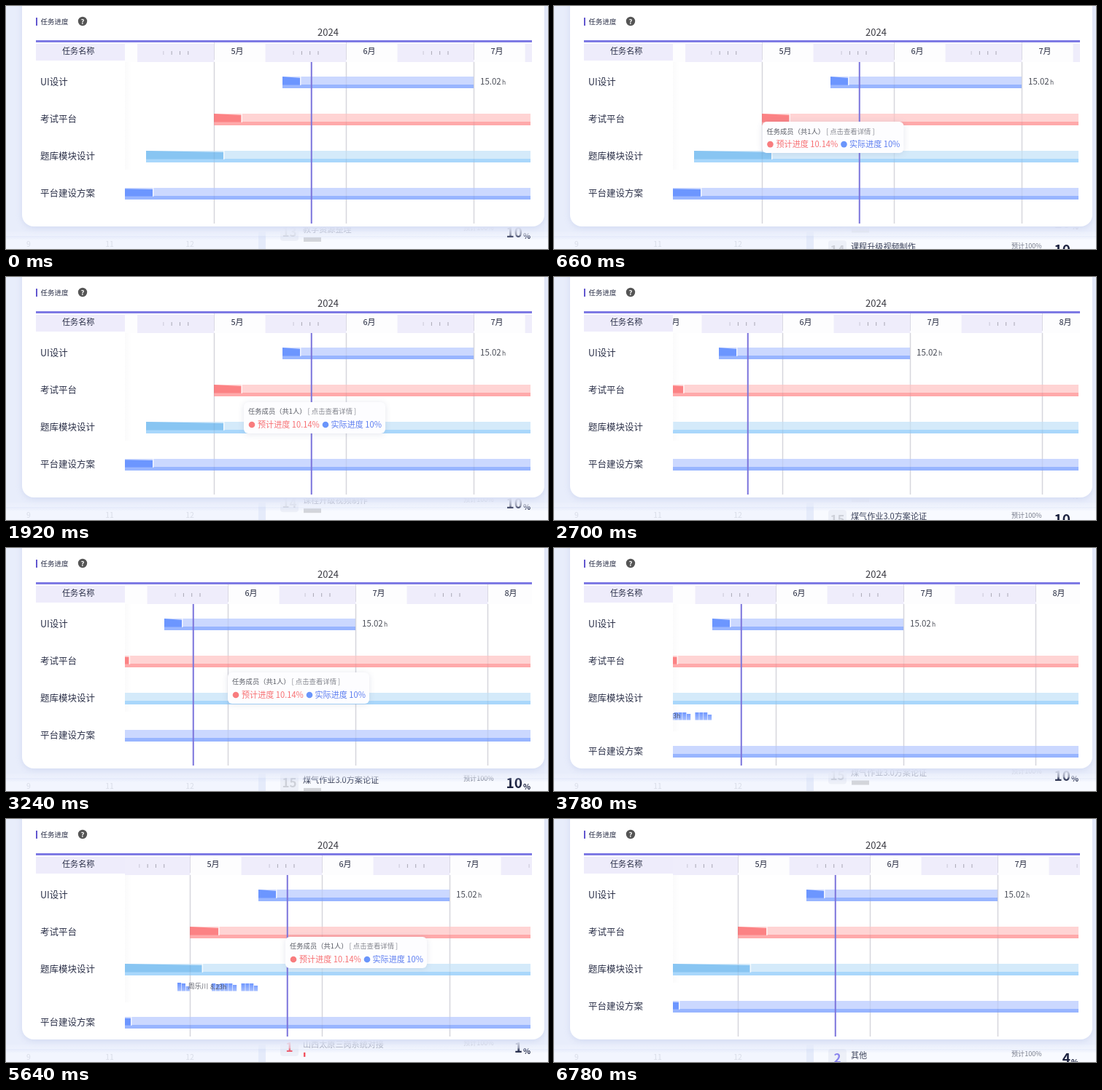
These frames come from a looping animation (743 by 334 pixels, 6840 ms). An HTML page with a canvas:

```html
<!DOCTYPE html>
<html lang="zh-CN">
<head>
<meta charset="utf-8">
<title>任务进度</title>
<style>
html, body { margin: 0; width: 100%; height: 100%; overflow: hidden; background: #e8edfb; }
canvas { display: block; width: 743px; height: 334px; }
</style>
</head>
<body>
<canvas id="stage"></canvas>
<script>
const W = 743, H = 334, LOOP = 6840, STEP = 60;
const FONT = '"Noto Sans CJK SC", "Noto Sans CJK", "Noto Sans CJK JP", sans-serif';
const canvas = document.getElementById('stage');
const ctx = canvas.getContext('2d');
const dpr = window.devicePixelRatio || 1;
canvas.width = W * dpr;
canvas.height = H * dpr;

const LEFT = 163, RIGHT = 719, DAY = 5.84;
const MONTHS = [[4, 110], [5, 285.5], [6, 466.5], [7, 641.5], [8, 822.5]];

// solid: right end of the finished part; drag: how far it follows the pan
const ROWS = [
  { name: 'UI设计', y: 97, from: 379, to: 641, solid: 403, drag: 1,
    light: '#cbd8ff', strip: '#98b5ff', dark: '#6c96ff' },
  { name: '考试平台', y: 148, from: 285, to: 1000, solid: 322.5, drag: 0.95,
    light: '#ffd4d4', strip: '#ffa9aa', dark: '#fc8284' },
  { name: '题库模块设计', y: 199, from: 192, to: 1000, solid: 298, drag: 0.89,
    light: '#d4eafa', strip: '#a9d7fb', dark: '#88c5f2' },
  { name: '平台建设方案', y: 250, from: 100, to: 1000, solid: 201, drag: 0.91,
    light: '#cbd8ff', strip: '#98b5ff', dark: '#6c96ff' }
];

const HOURS = [
  { x: 268, tops: [225, 226, 230] },
  { x: 315, tops: [226, 227, 226, 226, 226, 228] },
  { x: 355.5, tops: [226, 226, 226, 229] }
];

const QUEUE = [
  { rank: 13, name: '教学资源整理', pct: 10 },
  { rank: 14, name: '课程升级视频制作', pct: 10 },
  { rank: 15, name: '煤气作业3.0方案论证', pct: 10 },
  { rank: 1, name: '山西太原三岗系统对接', pct: 1, color: '#f2525f' },
  { rank: 2, name: '其他', pct: 4, color: '#8a84ee' }
];

// each path: [time, x, y] points, shown from the first time to the last
const TIPS = [
  [[180, 384, 117], [420, 384, 117], [720, 274, 164], [900, 274, 164]],
  [[1680, 326, 172], [2100, 326, 172]],
  [[3120, 304, 171], [3480, 304, 171]],
  [[5400, 311, 166], [5520, 311, 166], [5640, 383, 162], [6000, 383, 162]]
];

const clamp = v => Math.max(0, Math.min(1, v));
const lerp = (a, b, u) => a + (b - a) * u;
const smooth = u => u * u * (3 - 2 * u);

function pan(t) {
  if (t < 4700) return -162 * (1 - Math.pow(1 - clamp((t - 2280) / 680), 3));
  return lerp(-162, -33, smooth(clamp((t - 4700) / 680)));
}

const isOpen = t => (t >= 960 && t < 1920) || (t >= 3420 && t < 6060);

function rect(x, y, w, h, fill) {
  ctx.fillStyle = fill;
  ctx.fillRect(x, y, w, h);
}

function round(x, y, w, h, r, fill) {
  ctx.beginPath();
  ctx.roundRect(x, y, w, h, r);
  ctx.fillStyle = fill;
  ctx.fill();
}

function dot(x, y, r, fill) {
  ctx.beginPath();
  ctx.arc(x, y, r, 0, Math.PI * 2);
  ctx.fillStyle = fill;
  ctx.fill();
}

// y is the optical middle of the line
function text(s, x, y, size, fill, align = 'left', weight = 400) {
  ctx.font = `${weight} ${size}px ${FONT}`;
  ctx.textAlign = align;
  ctx.fillStyle = fill;
  ctx.fillText(s, x, y + size * 0.37);
}

function fade(x0, y0, x1, y1, ...stops) {
  const g = ctx.createLinearGradient(x0, y0, x1, y1);
  stops.forEach(([at, color]) => g.addColorStop(at, color));
  return g;
}

function clipped(x, y, w, h, draw) {
  ctx.save();
  ctx.beginPath();
  ctx.rect(x, y, w, h);
  ctx.clip();
  draw();
  ctx.restore();
}

function shadow(color, blur, dy) {
  ctx.shadowColor = color;
  ctx.shadowBlur = blur * dpr;
  ctx.shadowOffsetY = dy * dpr;
}

function queueItem(item, y) {
  const color = item.color || '#cdd0d8';
  round(376, y - 9, 25, 25, 4, '#edf0f8');
  text(item.rank, 388.5, y + 4, 17, color, 'center', 700);
  text(item.name, 407, y, 11.1, '#3a4159');
  text('预计100%', 627, y - 2, 9.1, '#777c8a');
  text(item.pct, 708, y + 4, 19, '#1d2340', 'right', 700);
  text('%', 709, y + 9, 10.5, '#1d2340', 'left', 700);
  rect(408, y + 11, item.pct * 2.4, 6, item.color || '#d3d5da');
}

function backdrop(t) {
  rect(0, 0, W, H, '#e8edfb');
  rect(0, 310, 346, 24, '#f2f5fe');
  rect(346, 310, 10, 24, '#e5ebfa');
  rect(356, 310, 387, 24, '#f8faff');
  [[9, 31], [11, 142], [12, 252]].forEach(([n, x]) =>
    text(n, x, 327, 10.5, '#d9dde8', 'center'));

  clipped(356, 304, 387, 30, () => {
    QUEUE.forEach((item, i) => queueItem(item, 307 + 37 * i - t * 0.01917));
  });
  rect(0, 303, W, 14, fade(0, 303, 0, 317,
    [0, 'rgba(232,237,251,1)'], [0.35, 'rgba(232,237,251,.85)'],
    [0.85, 'rgba(232,237,251,.6)'], [1, 'rgba(232,237,251,0)']));
  rect(0, 316, W, 6, fade(0, 316, 0, 322,
    [0, 'rgba(190,203,240,.25)'], [1, 'rgba(190,203,240,0)']));

  ctx.save();
  shadow('rgba(150,165,215,.28)', 9, 2);
  round(22, -20, 716, 323, 16, '#fff');
  ctx.restore();
}

function header(dx) {
  rect(41, 16, 2, 11, '#6257cf');
  text('任务进度', 47.5, 21, 9.5, '#2b3048');
  dot(105, 21, 6.2, '#555');
  text('?', 105, 21, 9.5, '#fff', 'center', 700);
  text('2024', 441.5, 36.5, 13, '#3a3a42', 'center');

  rect(41, 52, 122, 23, '#eeecfb');
  text('任务名称', 77, 62, 11.1, '#2b3048');

  clipped(LEFT, 49, 558, 28, () => {
    rect(LEFT, 49, 558, 28, '#fdfdfe');
    MONTHS.forEach(([n, x0], i) => {
      const x = x0 + dx;
      const next = MONTHS[i + 1] ? MONTHS[i + 1][1] + dx : x + 31 * DAY;
      const start = x + 12 * DAY;
      rect(start, 52, next - start, 25, '#efedfb');
      for (let k = 0; k < 4; k++) {
        const tx = (start + next) / 2 + (k - 1.5) * 11.3;
        rect(tx - 0.5, 62, 1, 5, k ? '#a9a8b5' : '#c9c7d6');
      }
      rect(x - 0.5, 49, 1, 25, '#d9d8e4');
      text(n + '月', x + 31.5, 62, 11, '#23283e', 'center', 500);
    });
  });
  rect(41, 47, 680, 3, '#7d79e4');
}

function bar(row, y, dx) {
  const a = row.from + dx, b = Math.min(row.to + dx, RIGHT);
  const s = row.solid + dx * row.drag;
  rect(a, y, b - a, 16, row.light);
  rect(a, y + 11, b - a, 5, row.strip);
  ctx.beginPath();
  ctx.moveTo(a, y);
  ctx.lineTo(s, y + 2);
  ctx.lineTo(s, y + 11.5);
  ctx.lineTo(a, y + 11.5);
  ctx.fillStyle = row.dark;
  ctx.fill();
  rect(s, y, 1.5, 12, 'rgba(255,255,255,.75)');
}

function hours(dx, t) {
  const fill = fade(0, 225, 0, 237, [0, '#6a93ff'], [1, '#a9c1ff']);
  HOURS.forEach(group => group.tops.forEach((top, i) =>
    rect(group.x + dx + i * 5.8, top, 5.2, 236.5 - top, fill)));
  const x = (t < 2400 ? 388 : 282.5) + dx;
  text('周乐川', x, 230, 9.3, '#62656f');
  text('8.23h', x + 30.5, 231, 8.7, '#555a68', 'left', 500);
}

function chart(t, dx) {
  const open = isOpen(t);
  const shift = i => i === 3 && open ? 22 : 0;
  rect(LEFT, 77, 9, open ? 175 : 148, fade(LEFT, 0, LEFT + 9, 0,
    [0, 'rgba(60,60,90,.025)'], [1, 'rgba(60,60,90,0)']));
  ROWS.forEach((row, i) => text(row.name, 47, row.y + 7.5 + shift(i), 12.5, '#2b3048'));

  clipped(LEFT, 77, RIGHT - LEFT, 222, () => {
    MONTHS.forEach(([, x]) => rect(x + dx - 0.75, 77, 1.5, 222, '#e2e2e7'));
    ROWS.forEach((row, i) => bar(row, row.y + shift(i), dx));
    MONTHS.forEach(([, x]) => rect(x + dx - 0.75, 77, 1.5, 222, 'rgba(60,60,90,.07)'));
    text('15.02', 650 + dx, 104, 11.5, '#4b4e58');
    text('h', 680 + dx, 105, 8.5, '#4b4e58');
    if (open) hours(dx, t);
    rect(417.75 + dx, 77, 2, 222, '#7b74dc');
  });
}

function tip(x, y) {
  ctx.save();
  shadow('rgba(90,100,150,.16)', 8, 1);
  round(x, y, 194, 43, 6, '#fdfdff');
  ctx.restore();
  text('任务成员（共1人）', x + 6, y + 13, 9.3, '#5a5d66');
  text('[ 点击查看详情 ]', x + 87.5, y + 13, 9.4, '#85878f');
  dot(x + 11, y + 31, 4.3, '#f87c7e');
  text('预计进度 10.14%', x + 19, y + 30.5, 11.1, '#f76f72');
  dot(x + 112, y + 31, 4.3, '#6a95fb');
  text('实际进度 10%', x + 119.5, y + 30.5, 11.1, '#5c7df0');
}

function tips(t) {
  TIPS.forEach(path => {
    if (t < path[0][0] || t >= path[path.length - 1][0]) return;
    const i = path.findIndex(p => t < p[0]);
    const [t0, x0, y0] = path[i - 1], [t1, x1, y1] = path[i];
    const u = smooth((t - t0) / (t1 - t0));
    tip(lerp(x0, x1, u), lerp(y0, y1, u));
  });
}

function draw(ms) {
  const t = Math.floor((ms % LOOP) / STEP) * STEP;
  const dx = Math.round(pan(t));
  ctx.setTransform(dpr, 0, 0, dpr, 0, 0);
  backdrop(t);
  header(dx);
  chart(t, dx);
  tips(t);
}

const begin = performance.now();
function loop() {
  draw(performance.now() - begin);
  requestAnimationFrame(loop);
}
loop();
</script>
</body>
</html>
```
